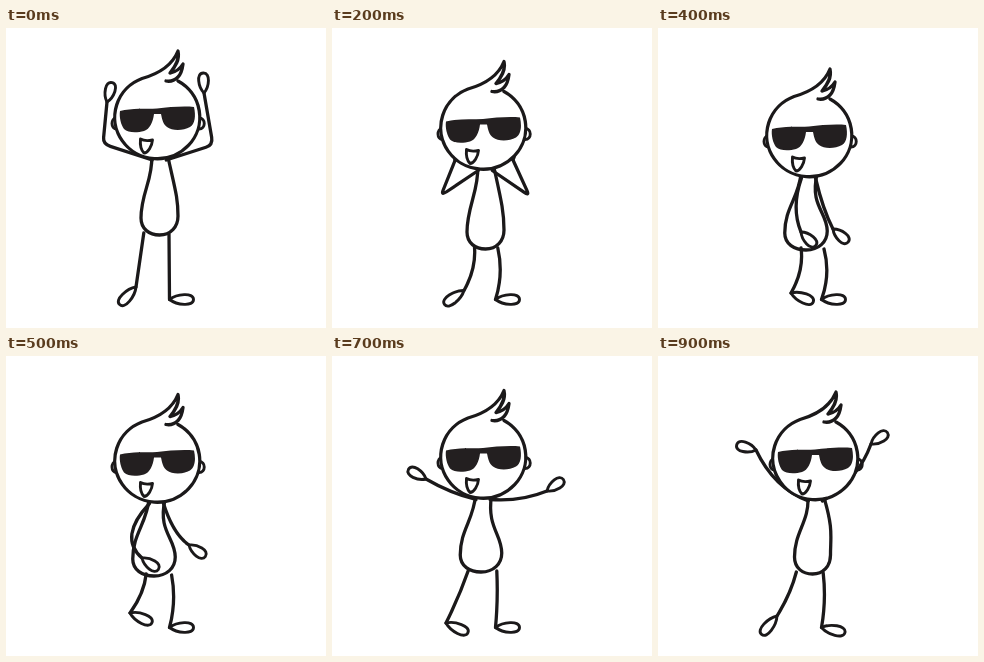
An HTML page that plays this animation: 320x300 px, repeating every 1000 ms.

```html
<!DOCTYPE html>
<html lang="en">
<head>
<meta charset="utf-8">
<title>Dancing stick figure</title>
<style>
  html, body { margin: 0; width: 100%; height: 100%; overflow: hidden; background: #fff; }
  #strip {
    display: block; width: 3200px; height: 300px;
    animation: play 1s steps(10) infinite;
  }
  @keyframes play { to { transform: translateX(-3200px); } }
  path { fill: none; stroke: #1b191a; stroke-width: 3.3; stroke-linecap: round; stroke-linejoin: round; }
  .thin { stroke-width: 2.9; }
  .white { fill: #fff; }
  .shades { fill: #231f20; stroke: none; }
</style>
</head>
<body>
<svg id="strip" viewBox="0 0 3200 300">
  <defs>
    <g id="head">
      <path class="thin" d="M110 90C105 90 104 101 111 101M193 90C200 90 200 101 193 101"/>
      <path class="white" d="M172 53A42.5 41.5 0 1 1 136 50.5C152 46 166 38 172 23C174 32 169 39 164 45C170 44 174 41 177 36C176 44 174 47 172 49C169 52 165 54 160 53"/>
      <path class="shades" d="M114 83C126 80 140 81 151 80.5C163 79 178 78 188 79C190 88 189 96 184 99C177 103 166 103 161 99C157 96 156 91 155 86L148 86C147 94 144 101 138 103C131 105 122 105 118 101C115 97 113 89 114 83Z"/>
      <path class="thin white" d="M134.5 111C138 113 142 113 146.500 112C146 118 142 125 138 125C135 122 134 116 134.500 111Z"/>
    </g>
  </defs>
</svg>
<script>
const FRAME_W = 320;

// head: shift; belly: lowest point; arms: elbow, wrist, hand angle;
// foot: ankle and angle of the free foot; round: 0 sharp elbows, 1 one arc.
const armsUp = {
  head: [0, 0], belly: [153.5, 207], round: [0.15],
  armL: [97, 116, 101, 74, -75], armR: [207, 117, 198, 65, -92], foot: [130, 259, 133]
};
const elbowsOut = {
  head: [0, 8], belly: [153.5, 219], round: [0.15],
  armL: [96, 142, 101, 92, -79], armR: [215, 146, 202, 91, -93], foot: [130, 260, 133]
};
const clasp = {
  head: [0, 13], belly: [153.5, 223], round: [0.15],
  armL: [122, 193, 145, 173, -52], armR: [180, 190, 160, 173, -115], foot: [134, 265, 156]
};
const crouch = {
  head: [0, 18], belly: [148, 222], round: [1],
  armL: [133, 180, 143, 204, 43], armR: [165, 182, 175, 201, 41], foot: [133, 265, 22]
};
const stepOut = {
  head: [0, 15.5], belly: [148, 220], round: [1],
  armL: [112, 181, 136, 202, 35], armR: [167, 178, 183, 189, 35], foot: [124, 257, 24]
};
const spread = {
  head: [0, 11.5], belly: [149, 216], round: [1],
  armL: [118, 137, 94, 123, 209], armR: [188, 146, 215, 135, -35], foot: [114, 267, 24]
};
const cheer = {
  head: [6, 13], belly: [154.5, 218], round: [1],
  armL: [116, 132, 98, 94, 195], armR: [200, 124, 213, 88, -35], foot: [119, 260, 130]
};

const mix = (a, b, t) => Object.fromEntries(Object.keys(a).map(key =>
  [key, a[key].map((v, i) => v + (b[key][i] - v) * t)]));

// The right arm swings wide on its way up while the free foot turns out.
const lifting = {
  ...mix(spread, cheer, 0.5),
  armR: [196, 142, 223, 106, -28], foot: [116, 263, 140]
};

const dance = [
  armsUp, elbowsOut, mix(elbowsOut, clasp, 0.5), clasp, crouch,
  stepOut, mix(stepOut, spread, 0.7), spread, lifting, cheer
];

const path = (d, cls = '') => `<path class="${cls}" d="${d}"/>`;
const toward = (a, b, t) => a.map((v, i) => v + (b[i] - v) * t);

// Teardrop for a hand or foot.
function loop([x, y], angle, size) {
  const turn = `rotate(${angle} ${x} ${y})`;
  const half = side => `${x + size} ${y + side * 7.5}`;
  return `<path class="thin" transform="${turn}" d="M${x} ${y}` +
    `C${x + size * 0.3} ${y + 5.5} ${half(1)} ${x + size} ${y}` +
    `C${half(-1)} ${x + size * 0.3} ${y - 5.5} ${x} ${y}Z"/>`;
}

function limb(root, joint, end, angle, size, round = 1) {
  const a = toward(joint, root, round), b = toward(joint, end, round);
  return path(`M${root}L${a}Q${joint} ${b}L${end}`) + loop(end, angle, size);
}

function leg(hip, ankle, bend, angle) {
  const [x, y] = toward(hip, ankle, 0.5);
  return limb(hip, [x + bend * 2, y], ankle, angle, 24);
}

// Neck, girth and bow of the body all follow from where the belly hangs.
function torso(neck, top, [x, y]) {
  const girth = 18.5 + (153.5 - x) / 2, bow = (x - 151) * 1.3;
  const left = x - girth, right = x + girth;
  return path(`M${neck - 7.5} ${top}` +
    `C${neck - 8 + bow / 2} ${top + 24} ${left} ${y - 42} ${left} ${y - 17}` +
    `C${left} ${y - 6} ${x - girth * 0.55} ${y} ${x} ${y}` +
    `C${x + girth * 0.6} ${y} ${right} ${y - 8} ${right} ${y - 19}` +
    `C${right} ${y - 38} ${neck + 9 + bow * 2} ${top + 32} ${neck + 8.5} ${top}`);
}

function figure({ head: [lean, drop], belly, armL, armR, foot, round }) {
  const [x, y] = belly, neck = (x + 153 + lean * 1.2) / 2;
  const bend = Math.max(0, y - 214) / 2;
  const arm = (side, [ex, ey, wx, wy, angle]) =>
    limb([neck + side * 7, drop + 132], [ex, ey], [wx, wy], angle, 20, round[0]);
  const hipL = [108 + foot[0] / 4 + (y - 216) * 0.3, y - 2];
  const hipR = [163 + (y - 207) / 5, y - 1];
  return torso(neck, drop + 128, belly) +
    leg(hipL, foot.slice(0, 2), bend, foot[2]) +
    leg(hipR, [163.5, 271.5], bend, lean * 2) +
    arm(-1, armL) + arm(1, armR) +
    `<use href="#head" x="${lean}" y="${drop}"/>`;
}

document.getElementById('strip').insertAdjacentHTML('beforeend',
  dance.map((p, i) => `<g transform="translate(${i * FRAME_W} 0)">${figure(p)}</g>`).join(''));
</script>
</body>
</html>
```
